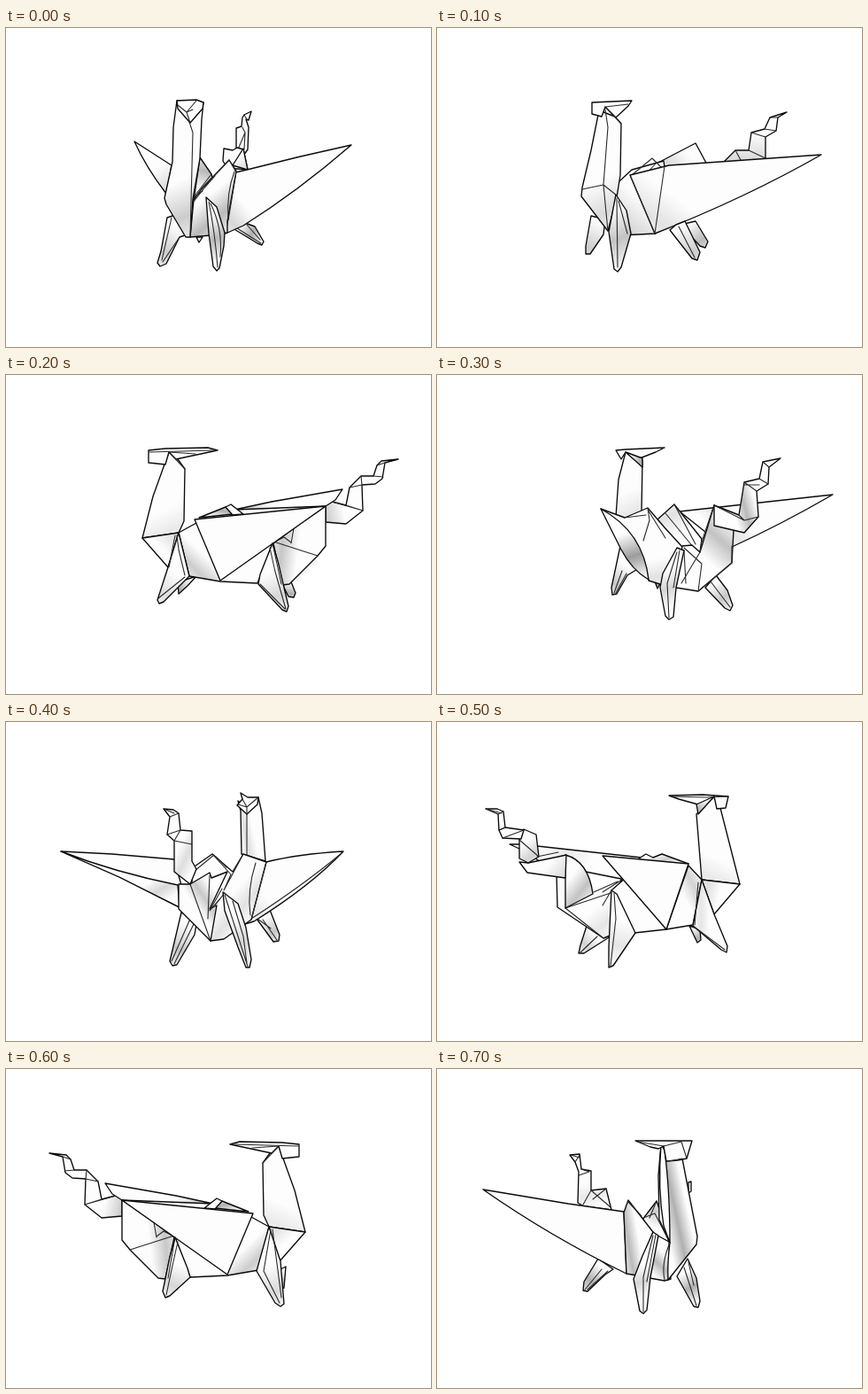
An HTML page with a canvas for the animation above (800 ms loop, 480 by 360 pixels).

```html
<!DOCTYPE html>
<html lang="en">
<head>
<meta charset="utf-8">
<title>Turning paper dragon</title>
<style>
html, body { margin: 0; width: 100%; height: 100%; overflow: hidden; background: #fff; }
canvas { display: block; width: 480px; height: 360px; }
</style>
</head>
<body>
<canvas id="stage" width="480" height="360"></canvas>
<script>
const STEP = 100;
const MIRROR = 492;
const ctx = document.getElementById('stage').getContext('2d');

// A closed path is a sheet of paper, an open one a crease.
// Shade: a soft band, dark at x, y and clear at x, y, then its strength.
const part = (d, ...shade) => ({ path: new Path2D(d), sheet: d.endsWith('Z'), shade });

const front = [
  part('M260 113L266 111L267 101L269 98L277 94L274 104L271 103L274 112L273 137L266 147L260 138Z'),
  part('M267 112L270 118L262 137M269 98L272 103M270 118L269 137'),
  part('M246 136L256 138L261 135L268 137L273 160L250 158L245 150Z'),
  part('M256 155L268 136L273 160Z', 272, 160, 262, 145, .2),
  part('M145 128L187 155L181 187Q158 157 145 128Z', 184, 180, 170, 158, .18),
  part('M219 146L232 165L236 180L212 195L217 160Z', 226, 162, 218, 182, .35),
  part('M256 226L270 220L281 224L291 241L289 245L284 243Z', 278, 232, 264, 224, .4),
  part('M261 226L288 243M272 222L287 239'),
  part('M182 214L191 211L205 233L196 236L181 266L174 269L171 265L175 252Z', 179, 252, 194, 226, .25),
  part('M187 214L176 262M196 236L177 264'),
  part('M215 236L218 242L222 236Z'),
  part('M390 132Q330 145 272 160L259 163L248 232L268 223Q330 184 390 132Z', 252, 215, 270, 200, .2),
  part('M208 236L212 194L222 180L252 149L260 161L250 218L250 231L231 234Z', 250, 205, 234, 185, .35),
  part('M221 182L252 149L260 163L251 217M232 165L211 192L222 184M236 167L222 183'),
  part('M222 183L212 196M258 162Q249 185 251 216'),
  part('M226 191L238 202L247 231L246 246L241 271L238 274L234 269L229 232Z', 244, 235, 234, 212, .35),
  part('M229 196Q236 231 239 270M231 198Q245 226 242 258'),
  part('M193 82L223 84L221 103L219 147L211 193L208 236L203 236L181 199L179 192L188 151L189 112Z', 203, 212, 188, 176, .25),
  part('M207 106L211 118L208 236'),
  part('M193 82L215 81L223 84L222 91L208 107L194 91Z'),
  part('M194 87L204 95L215 82M204 95L208 107M204 95L211 92')
];

const frontLeft = [
  part('M376 101L395 95L385 101L383 116L371 123L371 147L349 160L322 153L337 138L352 138L355 118L370 114Z', 358, 152, 358, 118, .2),
  part('M370 114L383 116M355 118L371 123M352 138L371 147M337 138L349 160M376 101L385 101'),
  part('M242 156L292 130L306 156Z', 260, 158, 282, 140, .2),
  part('M275 222L292 218L306 241L303 248L297 246Z', 298, 240, 284, 222, .35),
  part('M174 212L190 216L188 233L173 255L168 255L168 246Z', 172, 248, 184, 220, .25),
  part('M194 184L220 160L256 150L262 192L247 232L207 234Z', 200, 225, 228, 190, .25),
  part('M220 166L243 147L260 164M224 178L247 153'),
  part('M218 166L262 155Q350 149 434 143Q350 191 246 232Z', 248, 218, 268, 190, .14),
  part('M218 166L246 232M257 156L246 232'),
  part('M270 222L280 218L297 253L294 262L288 260L263 228Z', 292, 252, 274, 224, .25),
  part('M273 224L291 259'),
  part('M183 93L201 100L208 108L207 166L203 191L193 229L163 190L164 180L174 138Z', 192, 208, 176, 176, .18),
  part('M190 92L193 112L188 177L193 229M164 182L188 177L203 189'),
  part('M202 188L214 206L219 232L208 270L204 275L200 272L194 230Z', 213, 235, 200, 204, .3),
  part('M203 192L204 270M205 195L215 232'),
  part('M175 84L220 82L216 88L202 101L190 89L186 100L175 97Z'),
  part('M190 89L216 86M190 89L208 108')
];

const side = [
  part('M361 141L384 147L388 127L401 114L415 114L419 102L424 97L443 95L428 99L425 117L417 123L402 124L403 153L384 168L361 166Z', 362, 160, 382, 156, .25),
  part('M361 141L403 153M384 147L403 153M388 127L402 124M401 114L402 124M415 114L426 115M419 102L428 99'),
  part('M258 152L300 143L380 129L372 141L361 148Z', 280, 154, 292, 140, .25),
  part('M361 148L361 193L352 204L320 236L312 237L302 190L325 173Z', 310, 212, 328, 214, .28),
  part('M302 188L352 204M325 173L322 190M306 187L314 183L322 189'),
  part('M195 178L215 167L301 190L284 235L242 233L207 227Z', 206, 212, 219, 198, .25),
  part('M218 161L248 149L256 157Z', 240, 152, 238, 161, .4),
  part('M248 149L254 146L268 157L256 158Z'),
  part('M213 163L361 148L242 232Z'),
  part('M184 87L194 95L202 106L201 165L195 178L154 184L166 137Z', 194, 172, 184, 150, .1),
  part('M154 184L195 178L183 217Z', 190, 184, 178, 198, .14),
  part('M161 85L180 83L228 82L239 85L192 95L184 87L180 101L161 99Z'),
  part('M162 87L234 85M184 87L202 106M184 87L214 89')
];

const left = [
  part('M194 234L215 227L205 238L195 247Z', 198, 243, 206, 230, .4),
  part('M312 236L321 231L327 246L325 251L319 250Z', 318, 246, 320, 234, .4),
  ...side,
  part('M195 178L207 227L178 256L173 258L171 254L183 217Z', 180, 248, 194, 225, .16),
  part('M193 181L195 197L202 226M172 252L202 228M191 181L184 217'),
  part('M301 190L307 210L319 261L317 267L312 265L285 236L287 225Z', 311, 248, 300, 222, .2),
  part('M298 195L304 222L316 264M287 236L315 264M301 190L311 236')
];

const right = [
  part('M176 223L190 230L184 249L178 247Z', 180, 244, 184, 230, .4),
  part('M296 225L306 229L305 246L299 249L292 238Z', 300, 243, 298, 230, .4),
  ...side,
  part('M195 178L209 228L188 264L182 268L178 265L182 217Z', 186, 250, 196, 222, .18),
  part('M193 181L201 228L183 264M191 181L181 258'),
  part('M301 190L307 212L315 251L312 258L307 256L284 235L287 225Z', 308, 242, 298, 220, .2),
  part('M298 195L304 222L311 255M301 190L309 236')
];

const backLeft = [
  part('M447 135Q365 144 274 154L313 185L333 194Q388 169 447 135Z', 337, 180, 352, 168, .12),
  part('M207 193L230 217L215 226L203 247L198 248L197 240Z', 202, 236, 214, 216, .28),
  part('M209 221L200 246M214 224L202 246'),
  part('M246 233L249 241L253 234Z', 249, 236, 254, 236, .5),
  part('M303 240L315 226L328 243L334 260L331 266L325 263Z', 325, 250, 314, 234, .28),
  part('M309 233L331 262'),
  part('M213 87L232 96L231 156L210 163L202 160L205 118Z', 228, 150, 218, 130, .1),
  part('M202 85L213 84L257 82L247 87L229 94L213 87L208 95Z'),
  part('M213 87L232 94L232 104Z', 230, 98, 218, 91, .4),
  part('M249 163L268 146L299 185L297 200L276 196Z', 264, 158, 274, 180, .14),
  part('M268 146L292 191M258 156L290 195'),
  part('M185 151L212 161L238 150L256 171L277 194L268 241L239 232Q229 182 185 151Z', 250, 228, 246, 208, .14),
  part('M185 151Q233 177 239 231Q220 220 208 197Z', 223, 204, 214, 178, .5),
  part('M212 161L236 158M238 150L240 164L233 187M238 152L258 184'),
  part('M313 147L336 157L333 212L295 244L270 240L277 193L288 192L297 200Z', 324, 190, 306, 210, .3),
  part('M313 147L299 188L297 200L276 235M279 195L299 213L295 244M333 193L333 212L295 244'),
  part('M313 147L341 158L347 121L364 117L368 98L388 94L375 104L374 123L361 131L363 160L347 178L313 170Z', 347, 148, 360, 144, .35),
  part('M313 147L347 164L363 160M341 158L347 164M347 121L361 131M364 117L374 123M347 124L364 124M368 98L375 104'),
  part('M271 195L279 198L270 240L267 273L262 276L258 272L252 240L255 224Z', 264, 240, 258, 220, .2),
  part('M271 200L260 235L262 274M274 198L267 240M279 198L281 235')
];

const back = [
  part('M62 146L120 149L190 155L204 206L195 209L128 175Z'),
  part('M62 146Q124 170 194 184L196 209L128 175Z', 170, 192, 163, 180, .2),
  part('M283 222L298 212L309 240L308 247L302 248Z', 300, 238, 290, 222, .28),
  part('M290 223L306 246M284 222L299 233'),
  part('M198 215L216 222L213 240L193 274L188 275L185 270Z', 193, 256, 205, 230, .28),
  part('M209 220L187 270M213 226L190 273'),
  part('M381 146Q330 149 294 158L266 175L270 228L280 225Q344 185 381 146Z', 282, 214, 296, 200, .1),
  part('M379 148Q336 184 277 222'),
  part('M262 89L272 98L285 85L289 103L293 157L266 149L265 100Z', 271, 128, 280, 126, .15),
  part('M272 104L272 150'),
  part('M265 80L273 85L285 85L284 93L272 104L261 94L267 87Z'),
  part('M262 93L272 96L285 85M267 87L272 96L272 104'),
  part('M210 165L233 149L256 169L268 149L294 158L277 223L246 245L231 247L210 220Z', 270, 205, 256, 192, .14),
  part('M233 149L254 172L246 190M237 152L249 164M268 149L246 190M294 158L277 223M282 159Q272 190 276 218'),
  part('M195 183L208 183L230 170L232 176L250 169L230 211L238 207L231 247L195 211Z', 221, 194, 210, 202, .28),
  part('M208 183L231 247M213 168L235 150M230 173L228 222M244 188L230 213L247 193L236 207'),
  part('M178 98L189 99L195 103L197 122L210 123L210 157L215 166L208 183L190 169L190 134L182 127L185 107Z', 206, 148, 194, 142, .16),
  part('M190 134L210 138M185 107L195 103M182 127L197 122M197 122L190 134M178 98L190 103'),
  part('M245 192L262 205L271 232L277 268L275 277L271 277L262 254L247 213Z', 269, 248, 258, 220, .2),
  part('M247 195L273 276M256 202L268 242L272 272')
];

const backRight = [
  part('M82 138L95 138L231 153L200 188L150 178L93 143Z', 146, 148, 176, 158, .1),
  part('M285 230L297 234L298 246L294 249Z', 295, 244, 290, 232, .4),
  part('M169 230L189 243L199 240L166 261L160 261L162 252Z', 168, 252, 180, 242, .22),
  part('M181 242L162 260'),
  part('M228 154L236 149L244 153L254 149L284 160L240 161Z', 248, 158, 246, 151, .25),
  part('M135 172L148 165L208 177L198 240L188 244L136 209Z', 186, 230, 174, 214, .12),
  part('M145 210L196 193M145 210L188 244M177 192L204 180M187 192L212 176'),
  part('M197 190L214 175L259 234L223 238Z'),
  part('M284 162L299 178L289 229L259 234Z', 294, 192, 280, 200, .22),
  part('M187 151L284 160L259 234Z'),
  part('M293 104L313 84L320 97L342 183L299 178Z', 306, 174, 316, 154, .1),
  part('M299 178L342 183L313 217Z', 305, 188, 320, 192, .16),
  part('M299 178L313 217L328 253L327 260L321 257L289 230Z', 298, 220, 308, 220, .12),
  part('M295 181L291 229M289 230L325 257'),
  part('M262 83L300 82L329 84L326 97L316 98L313 84L302 95L273 87Z'),
  part('M293 93L313 84L295 104Z', 296, 101, 306, 90, .4),
  part('M264 84L305 85L329 84'),
  part('M145 150Q171 157 176 194L145 210Z', 167, 186, 152, 174, .3),
  part('M103 159L137 152L146 150L145 176L102 170L93 158Z', 140, 172, 126, 160, .15),
  part('M98 121L112 127L115 152L103 159L93 154L93 133Z', 111, 148, 101, 135, .22),
  part('M70 122L77 119L98 122L95 132L74 131Z'),
  part('M55 98L68 98L75 101L77 119L70 122L69 104Z'),
  part('M69 104L75 101M74 131L98 122M93 133L115 152M113 152L137 147M55 98L73 103'),
  part('M197 190L203 194L224 238L199 275L194 277L194 254Z', 200, 250, 208, 224, .12),
  part('M200 193L202 222L196 275M197 190L187 207')
];

const frontRight = [
  part('M284 128L287 127L287 138L284 140Z'),
  part('M150 97L161 96L163 113L174 115L174 137L191 135L197 159L166 155L159 151L160 116L156 105Z', 168, 144, 164, 130, .1),
  part('M156 105L161 97M160 120L172 116L163 113M165 153L174 137L196 156M176 147L191 135M151 97L161 100'),
  part('M182 214L199 226L190 232L170 251L165 250L166 240Z', 174, 240, 188, 226, .4),
  part('M186 226L167 249M193 228L170 249'),
  part('M283 214L293 236L297 262L295 269L290 268L271 234Z', 288, 246, 280, 230, .4),
  part('M279 224L293 267M284 218L290 244'),
  part('M232 170L248 149L258 178L262 195L245 187Z', 250, 162, 244, 178, .25),
  part('M233 168L246 163L262 194M248 149L240 168'),
  part('M242 184L262 195L264 237L257 239L224 233Z', 248, 218, 257, 208, .35),
  part('M52 136L148 152L211 161L214 231Q128 189 52 136Z'),
  part('M216 148L211 162L214 231L226 233L244 184Z', 217, 200, 229, 198, .35),
  part('M216 150L231 166'),
  part('M253 85L262 93L277 101L294 189L293 198L261 238Q260 219 263 196L251 170L250 120Z', 269, 160, 283, 157, .4),
  part('M253 85L257 92Q263 136 263 196L256 177Q249 135 253 85Z'),
  part('M263 196Q253 220 257 238'),
  part('M224 81L288 81L282 101L272 103L259 104L256 87L250 90L241 88Z'),
  part('M256 87L276 82L282 101M262 104L277 101M226 82L256 87'),
  part('M244 184L250 188L241 235L237 272L233 276L229 273L222 237L232 211Z', 232, 240, 227, 222, .2),
  part('M244 188L233 235L233 274M247 187L237 240')
];

const poses = [front, frontLeft, left, backLeft, back, backRight, right, frontRight];

function tint([x1, y1, x2, y2, strength]) {
  const g = ctx.createLinearGradient(2 * x1 - x2, 2 * y1 - y2, x2, y2);
  g.addColorStop(0, 'rgba(60,60,60,0)');
  g.addColorStop(.5, `rgba(60,60,60,${strength})`);
  g.addColorStop(1, 'rgba(60,60,60,0)');
  return g;
}

function drawPart({ path, sheet, shade }) {
  if (sheet) {
    ctx.fillStyle = '#fdfdfd';
    ctx.fill(path);
    if (shade.length) {
      ctx.fillStyle = tint(shade);
      ctx.fill(path);
    }
  }
  ctx.lineWidth = sheet ? 1.35 : 1.1;
  ctx.strokeStyle = sheet ? '#0a0a0a' : '#2a2a2a';
  ctx.stroke(path);
}

let shown = -1;
function tick() {
  const i = Math.floor(performance.now() / STEP) % poses.length;
  if (i !== shown) {
    shown = i;
    ctx.setTransform(1, 0, 0, 1, 0, 0);
    ctx.fillStyle = '#fff';
    ctx.fillRect(0, 0, 480, 360);
    if (poses[i] === right) ctx.setTransform(-1, 0, 0, 1, MIRROR, 0);
    ctx.lineJoin = ctx.lineCap = 'round';
    poses[i].forEach(drawPart);
  }
  requestAnimationFrame(tick);
}
tick();
</script>
</body>
</html>
```
